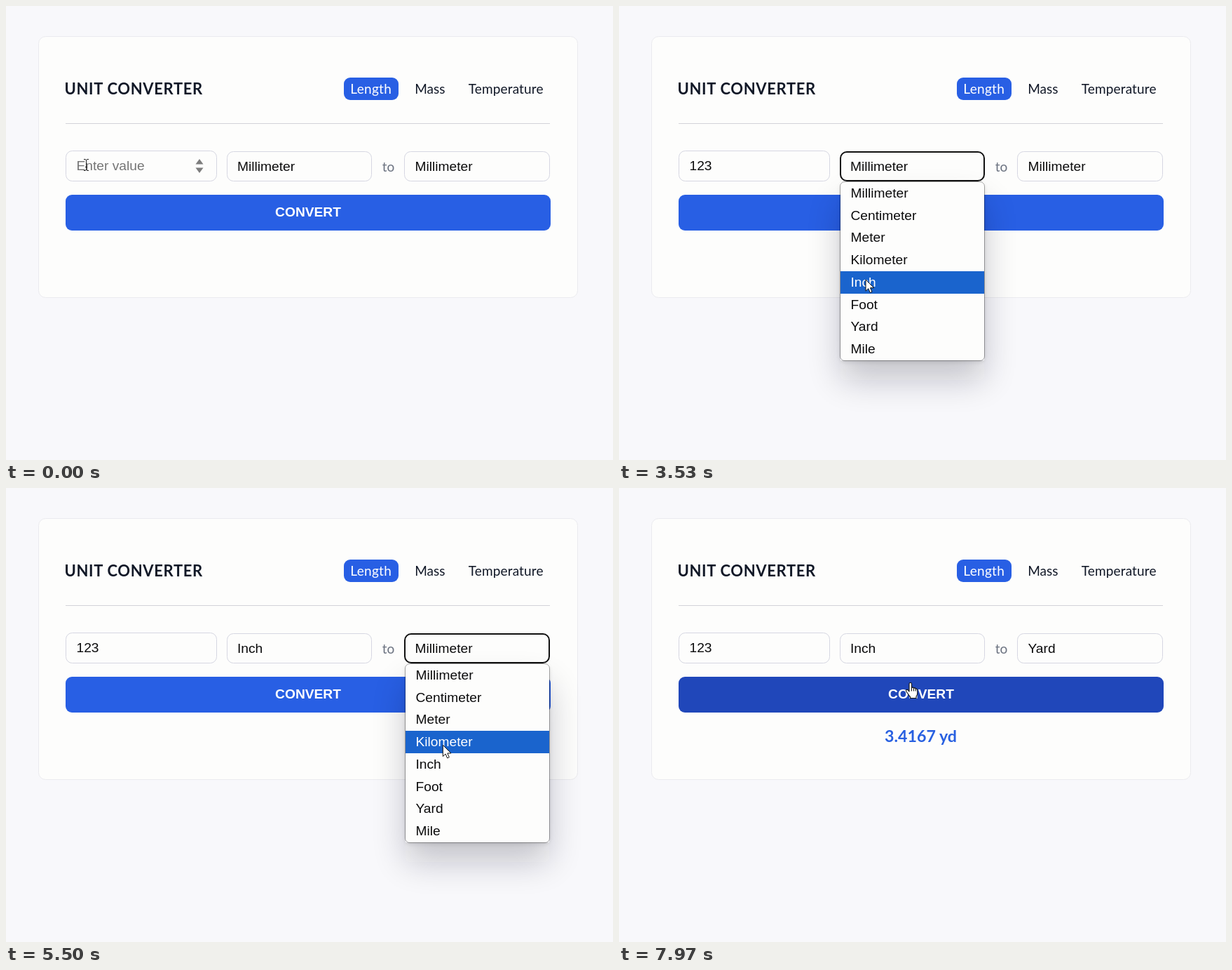
Recreate the animation shown at these times as an HTML page. Size 866 px wide and 647 px high, loop 8 s.

```html
<!DOCTYPE html>
<html lang="en">
<head>
<meta charset="utf-8">
<title>Unit converter</title>
<style>
  html, body { margin: 0; width: 100%; height: 100%; overflow: hidden; background: #f8f8fb; }
  svg { display: block; width: 866px; height: 647px; }
  text { font: 19.2px "Liberation Sans", Arial, sans-serif; fill: #0b0b0c; }
  .ui { font: 19px Lato, sans-serif; fill: #111827; text-anchor: middle; }
  .title { font: bold 22px Lato, sans-serif; fill: #111827; letter-spacing: .65px; }
  .result { font: bold 23.2px Lato, sans-serif; fill: #2860e1; text-anchor: middle; }
  .cta { font-weight: bold; fill: #fff; text-anchor: middle; }
  .field { fill: #fdfdfc; stroke: #d6d7e2; }
  .field.focus { stroke: #101010; stroke-width: 2; }
</style>
</head>
<body>
<svg viewBox="0 0 866 647">
  <defs>
    <filter id="blur" x="-80%" y="-80%" width="260%" height="260%"><feGaussianBlur stdDeviation="24"/></filter>
    <filter id="soft" x="-20%" y="-20%" width="140%" height="140%"><feGaussianBlur stdDeviation="3"/></filter>
    <clipPath id="outside"><path clip-rule="evenodd" d="M-700 -300H900V700H-700ZM0 0V254H205V0Z"/></clipPath>
    <clipPath id="inside"><rect width="205" height="254" rx="6"/></clipPath>
  </defs>

  <rect width="866" height="647" fill="#f8f8fb"/>
  <rect x="46.5" y="43.5" width="769" height="372" rx="10" fill="#fdfdfc" stroke="#ebebef"/>
  <text class="title" x="83.5" y="126">UNIT CONVERTER</text>
  <rect x="482" y="102" width="78" height="32" rx="9" fill="#285fe4"/>
  <text class="ui" x="520.7" y="125" style="fill:#fff;letter-spacing:.3px">Length</text>
  <text class="ui" x="604.8" y="125">Mass</text>
  <text class="ui" x="713.2" y="125" style="letter-spacing:.15px">Temperature</text>
  <path d="M85 167.5H776" stroke="#d3d3d9"/>

  <rect id="input" class="field" rx="9"/>
  <rect id="from" class="field" rx="9"/>
  <rect id="into" class="field" rx="9"/>
  <text id="value" x="100.5" y="234"></text>
  <path id="caret" d="M133.5 217V238" stroke="#000"/>
  <path id="spin" d="M270.5 225.5L276 218L281.5 225.5ZM270.5 230.5L276 238L281.5 230.5Z" fill="#7d7d7d"/>
  <text id="fromText" x="330" y="235"></text>
  <text class="ui" x="545.6" y="235.5" style="fill:#6b7280">to</text>
  <text id="intoText" x="583.5" y="235"></text>

  <rect id="button" x="85" y="269" width="692" height="51" rx="9"/>
  <text class="cta" x="431" y="300">CONVERT</text>
  <text id="result" class="result" x="430.5" y="362">3.4167 yd</text>

  <g id="menu">
    <g clip-path="url(#outside)">
      <rect x="0" y="28" width="205" height="254" rx="6" fill="#0c0c24" opacity=".22" filter="url(#blur)"/>
      <rect x="0" y="2" width="205" height="254" rx="6" opacity=".12" filter="url(#soft)"/>
    </g>
    <g id="list" clip-path="url(#inside)">
      <rect width="205" height="254" fill="#fdfdfc"/>
      <rect id="mark" width="205" height="32" fill="#1a64cd"/>
    </g>
    <rect x="-.5" y="-.5" width="206" height="255" rx="6.5" fill="none" stroke="#000" stroke-opacity=".32"/>
  </g>

  <g id="beam" fill="none" stroke="#222">
    <path d="M-3 -7.5H-1L.5 -6.5L2 -7.5H4M-3 8.5H-1L.5 7.5L2 8.5H4M.5 -6.5V7.5M-1 3.5H2"/>
  </g>
  <path id="arrow" d="M0 0V16.2L3.8 12.7L6.3 18.6L9 17.4L6.5 11.7H11.7Z" fill="#fff" stroke="#111" stroke-linejoin="round"/>
  <g id="hand" fill="#fff" stroke="#111" stroke-width="1.1" stroke-linejoin="round">
    <path d="M-2 1.8Q-2 0 -.3 0T1.5 1.8V7.6Q1.7 6.5 3 6.6T4.5 8Q4.8 7.1 6 7.4T7.3 9Q7.7 8.3 8.7 8.7T9.7 10.5V15Q9.7 18 8 19.5V22H-.5V20Q-2.3 18.6 -3.6 16L-6.3 12.3Q-7 10.8 -5.7 10.1T-3.3 11L-2 12.6Z"/>
    <path d="M1.5 7.6V12M4.5 8V12M7.3 9V12" fill="none"/>
  </g>
</svg>
<script>
const LOOP = 8000, ROW = 31.7, MENU_TOP = 251;
const UNITS = ["Millimeter", "Centimeter", "Meter", "Kilometer", "Inch", "Foot", "Yard", "Mile"];
const KEYS = [950, 1150, 1350];
const MENUS = [
  { x: 316, open: 2350, close: 3600 },
  { x: 570, open: 4800, close: 6400 }
];
// left, top, right, bottom
const FIELDS = {
  input: [85, 206, 301, 250],
  from: [315, 207, 522, 250],
  into: [568, 207, 776, 250]
};

const EASE = {
  both: p => p * p * (3 - 2 * p),
  in: p => p * (0.6 + 0.4 * p),
  out: p => p * (1.5 - 0.5 * p)
};
// time, x, y, easing into this point
const PATH = [
  [0, 114, 226], [1500, 114, 226], [1670, 116, 226, "both"], [1800, 116, 226],
  [2250, 368, 227, "both"], [2600, 368, 227], [2900, 367, 270, "both"], [3050, 367, 270],
  [3450, 352, 390, "both"], [3750, 352, 390], [4170, 495, 289, "in"], [4550, 633, 222, "out"],
  [5050, 633, 222], [5800, 618, 444, "both"], [6750, 618, 446, "both"],
  [7400, 416, 277.5, "both"], [LOOP, 416, 277.5]
];

const $ = id => document.getElementById(id);
const show = (id, on) => $(id).setAttribute("display", on ? "inline" : "none");
const within = (v, a, b) => v >= a && v < b;

const labels = UNITS.map((name, i) => {
  const label = document.createElementNS("http://www.w3.org/2000/svg", "text");
  label.textContent = name;
  label.setAttribute("x", 14.5);
  label.setAttribute("y", Math.round(i * ROW + 22));
  $("list").append(label);
  return label;
});

function pointer(t) {
  const i = Math.max(1, PATH.findIndex(k => k[0] > t));
  const [t0, x0, y0] = PATH[i - 1], [t1, x1, y1, ease = "both"] = PATH[i];
  const p = EASE[ease]((t - t0) / (t1 - t0));
  return [x0 + (x1 - x0) * p, y0 + (y1 - y0) * p];
}

function mix(a, b, p) {
  return `rgb(${a.map((v, i) => Math.round(v + (b[i] - v) * p))})`;
}

// The border stays inside the field's box, whatever its width.
function drawBox(id, focused) {
  const [l, t, r, b] = FIELDS[id], inset = focused ? 1 : 0.5;
  const box = { x: l + inset, y: t + inset, width: r - l - 2 * inset, height: b - t - 2 * inset };
  for (const key in box) $(id).setAttribute(key, box[key]);
  $(id).classList.toggle("focus", focused);
}

function drawValue(t, focused) {
  const typed = KEYS.filter(k => t >= k);
  const value = $("value");
  value.textContent = "123".slice(0, typed.length) || "Enter value";
  value.style.fill = typed.length ? "#0b0b0c" : "#757575";
  const since = t - (typed.length ? typed[typed.length - 1] : 450);
  show("caret", focused && since % 1000 < 500);
  $("caret").setAttribute("transform", `translate(${(typed.length - 3) * 10.68})`);
}

function drawMenu(t, y) {
  const menu = MENUS.find(m => within(t, m.open, m.close));
  show("menu", menu);
  if (!menu) return false;
  $("menu").setAttribute("transform", `translate(${menu.x} ${MENU_TOP})`);
  show("list", t >= menu.open + 60);
  const row = Math.max(0, Math.floor((y - MENU_TOP) / ROW));
  $("mark").setAttribute("y", Math.round(row * ROW));
  labels.forEach((label, i) => label.style.fill = i === row ? "#fff" : "#0b0b0c");
  return true;
}

function draw(t) {
  const [x, y] = pointer(t);
  const menuOpen = drawMenu(t, y);
  const overInput = !menuOpen && within(x, 85, 301) && within(y, 206, 250);
  const overButton = !menuOpen && within(x, 85, 777) && within(y, 269, 320);
  const typing = within(t, 450, MENUS[0].open);
  drawBox("input", typing);
  drawBox("from", within(t, MENUS[0].open, MENUS[1].open - 30));
  drawBox("into", within(t, MENUS[1].open - 30, 7720));
  drawValue(t, typing);
  show("spin", overInput);

  $("fromText").textContent = UNITS[t < MENUS[0].close ? 0 : 4];
  $("intoText").textContent = UNITS[t < MENUS[1].close ? 0 : 6];

  const press = Math.min(1, Math.max(0, (t - 7720) / 120));
  $("button").setAttribute("fill", overButton ? mix([35, 79, 213], [32, 71, 186], press) : "#285fe4");
  show("result", t >= 7840);

  const shape = overInput ? "beam" : overButton ? "hand" : "arrow";
  for (const id of ["beam", "arrow", "hand"]) show(id, id === shape);
  $(shape).setAttribute("transform", `translate(${x.toFixed(1)} ${y.toFixed(1)})`);
}

const start = performance.now();
function tick() {
  draw((performance.now() - start) % LOOP);
  requestAnimationFrame(tick);
}
tick();
</script>
</body>
</html>
```
